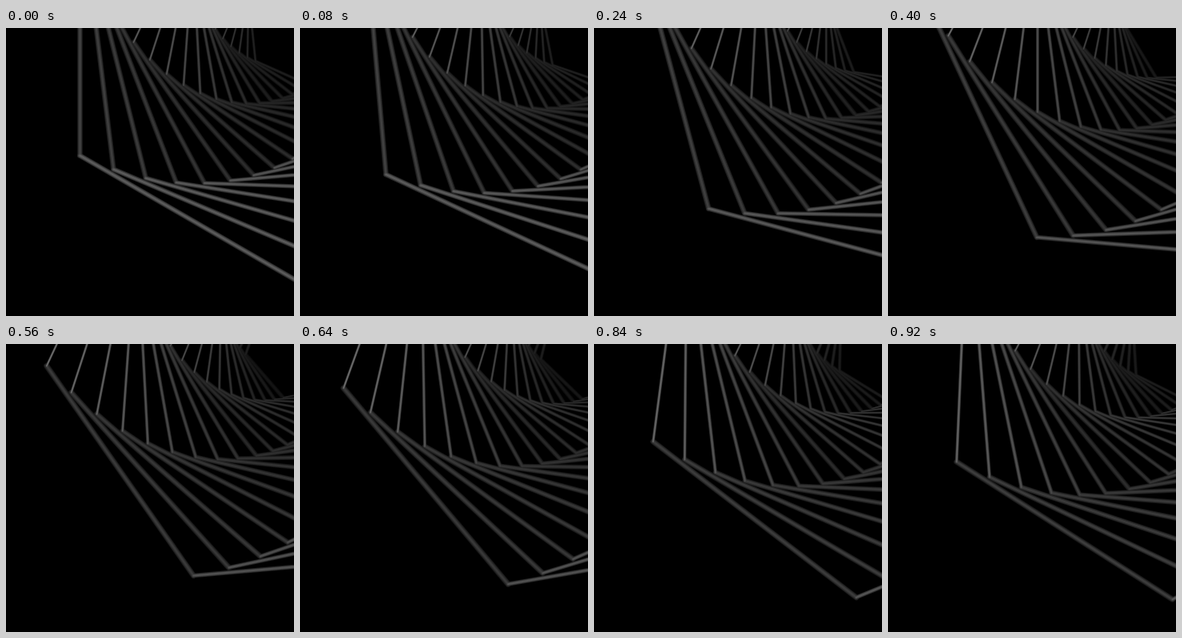
Animation, 360 px wide and 360 px high, one loop 0.96 s. Source, as an HTML page with a canvas:

```html
<!DOCTYPE html>
<html lang="en">
<head>
<meta charset="utf-8">
<title>Hexagon spiral</title>
<style>
  html, body { margin: 0; width: 100%; height: 100%; overflow: hidden; background: #000; }
  canvas { display: block; }
</style>
</head>
<body>
<canvas id="stage" width="360" height="360"></canvas>
<script>
const ctx = document.getElementById('stage').getContext('2d');
const LOOP = 960, STEP = 40;
const CENTER = { x: 369.6, y: -0.5 };
const RADIUS = 320, SHRINK = 0.92, TWIST = 7, RINGS = 19;
const SHEEN = [15, 65, 65, 30, 30, 30]; // how strongly each side catches the light
const rad = deg => deg * Math.PI / 180;

const point = (r, deg) => [
  CENTER.x + r * Math.cos(rad(deg)),
  CENTER.y + r * Math.sin(rad(deg))
];

function line(from, to, width, level) {
  const g = Math.round(level);
  ctx.strokeStyle = `rgb(${g},${g},${g})`;
  ctx.lineWidth = width;
  ctx.beginPath();
  ctx.moveTo(...from);
  ctx.lineTo(...to);
  ctx.stroke();
}

// Soft bar: bright core, darker rim
function bar(from, to, width, level) {
  line(from, to, width, level * 0.42);
  line(from, to, width * 0.7, level * 0.75);
  line(from, to, width * 0.35, level);
}

function drawRing(i, turn, progress) {
  const r = RADIUS * SHRINK ** i;
  const fade = 1 - i / 28;
  for (let k = 0; k < 6; k++) {
    const start = 150 - turn - TWIST * i + 60 * k;
    const shine = SHEEN[k] * Math.abs(Math.sin(rad(start - 110)));
    const glow = k === 5 ? 25 * Math.max(0, 1 - progress * 1.7) : 0;
    const level = (56 + shine + glow) * fade;
    const width = (7.3 - shine / 13) * (1 - 0.015 * i);
    bar(point(r, start), point(r, start + 60), width, level);
  }
}

function draw(time) {
  const progress = Math.floor((time % LOOP) / STEP) * STEP / LOOP;
  ctx.globalCompositeOperation = 'source-over';
  ctx.fillStyle = '#000';
  ctx.fillRect(0, 0, 360, 360);
  ctx.globalCompositeOperation = 'lighten';
  ctx.lineCap = 'round';
  for (let i = 0; i < RINGS; i++) drawRing(i, 60 * progress, progress);
}

const begin = performance.now();
function tick() {
  draw(performance.now() - begin);
  requestAnimationFrame(tick);
}
tick();
</script>
</body>
</html>
```
